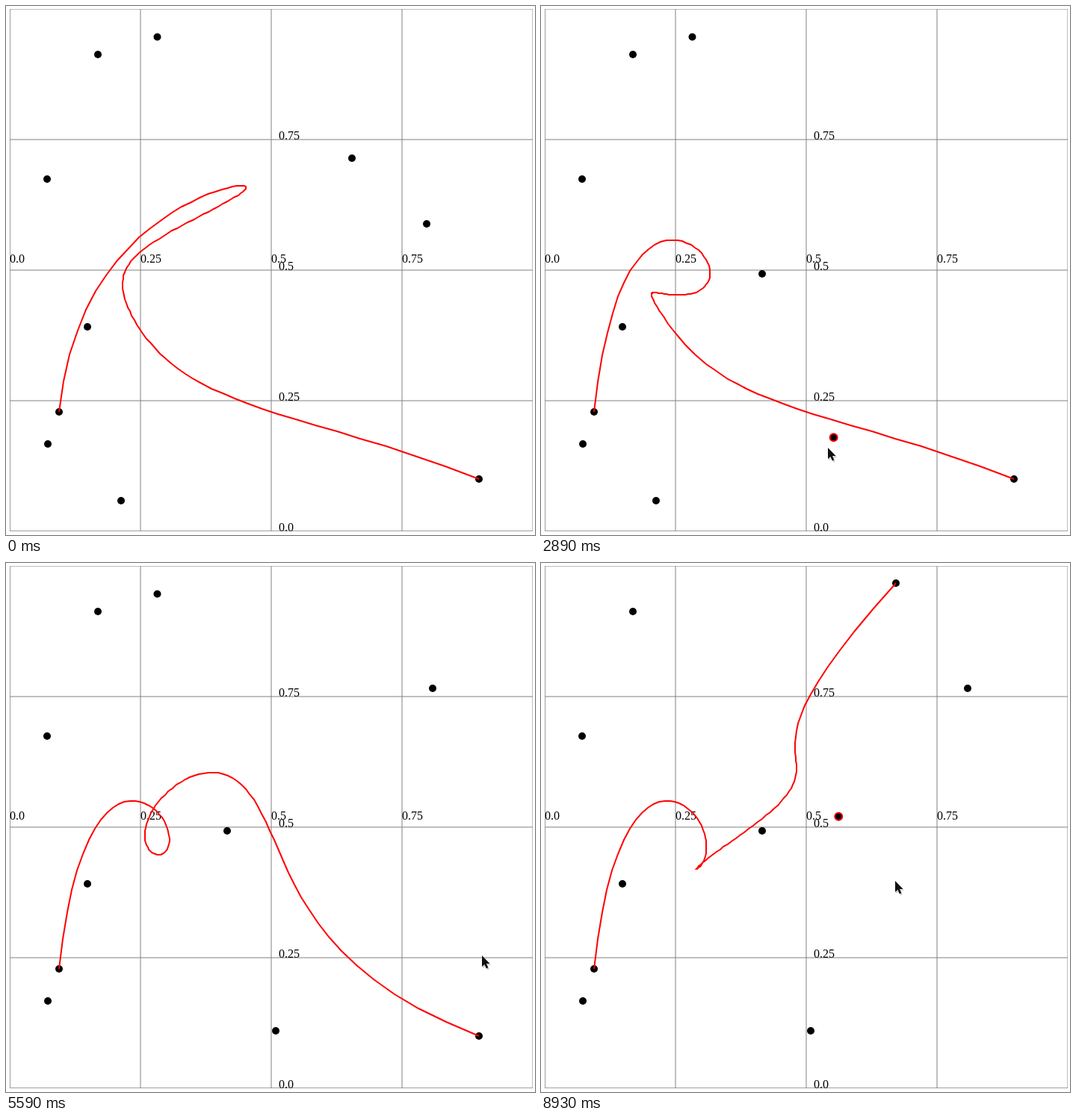
An HTML page for the animation above (8960 ms loop, 708 by 709 pixels).

```html
<!DOCTYPE html>
<html>
<head>
<meta charset="utf-8">
<style>
  html, body { margin: 0; width: 100%; height: 100%; overflow: hidden; background: #fff; }
  svg { display: block; }
  text { font: 16px "Liberation Serif", serif; }
  #grid path, #grid rect { fill: none; stroke: gray; }
  .held { stroke: red; stroke-width: 2; }
  #curve { fill: none; stroke: red; stroke-width: 2; }
</style>
</head>
<body>
<svg width="708" height="709">
  <svg id="grid" x="5" y="4" width="700" height="700"><rect width="700" height="700"/></svg>
  <g id="dots"></g>
  <path id="curve"/>
  <g id="cursor">
    <path d="M1 2V17L4.5 14L7 19.5L9.8 18.3L7.4 13H12Z" opacity=".22"/>
    <path d="M0 0V15L3.4 12L5.8 17.4L8.4 16.2L6 11H10.6Z" fill="#111" stroke="#fff" paint-order="stroke"/>
  </g>
</svg>
<script>
const LOOP = 8960, POINT_LAG = 40, CURVE_LAG = 52;
const $ = id => document.getElementById(id);

function add(parent, tag, attrs, text = '') {
  const el = document.createElementNS('http://www.w3.org/2000/svg', tag);
  for (const k in attrs) el.setAttribute(k, attrs[k]);
  el.textContent = text;
  return parent.appendChild(el);
}

const smooth = u => u * u * (3 - 2 * u);
const easeIn = u => u * u;
const easeOut = u => 1 - (1 - u) ** 3;

// control points of the Bezier curve, in order
const [A, D, G, F, C, I, E, J, B, H] = [
  [71, 544], [123, 65], [563, 292], [463, 204], [55, 232],
  [56, 587], [202.5, 41.5], [154, 663], [109, 430], [633, 634]];
const points = [A, D, G, F, C, I, E, J, B, H];
const corner = [122, 575];

// pointer strokes: start and end time, path, easing
const strokes = [
  [440, 1450, [G, [904, 10], [296, 359]], smooth],
  [1550, 1912, [[296, 359], [539, 218], F], smooth],
  [2440, 3240, [F, [505, 415], [361, 627]], easeOut],
  [3240, 3780, [[361, 627], J], smooth],
  [4119, 5236, [J, [375, 432], [571, 168]], smooth],
  [5240, 5800, [[571, 168], [657, 490], H], smooth],
  [5890, 6690, [H, corner], smooth],
  [6700, 7620, [corner, [54, 406], [-58, -58], [475, 27]], smooth],
  [7700, 8250, [[475, 27], E], smooth],
  [8640, 8930, [E, [318, 261], [474, 426]], easeIn]];

// dragged point, press and release time
const drags = [[G, 290, 1500], [F, 2040, 3240], [J, 3910, 5236], [H, 5850, 7650], [E, 8370, LOOP]];

// de Casteljau
function bezier(pts, t) {
  while (pts.length > 1)
    pts = pts.slice(1).map((p, i) => p.map((v, c) => pts[i][c] + (v - pts[i][c]) * t));
  return pts[0];
}

function pointer(t) {
  const [from, to, path, ease] = strokes.findLast(s => s[0] <= t) || strokes[0];
  return bezier(path, ease(Math.min(1, Math.max(0, (t - from) / (to - from)))));
}

function pointsAt(t, lag) {
  return points.map(p => {
    const drag = drags.find(d => d[0] === p && t > d[1]);
    return drag ? pointer(Math.min(Math.max(t - lag, drag[1]), drag[2] - 1)) : p;
  });
}

for (let i = 0; i < 4; i++) {
  const label = i % 2 ? i / 4 : (i / 4).toFixed(1), x = 175 * i, y = 700 - x;
  add($('grid'), 'path', { d: `M${x} 0V700M0 ${y}H700` });
  add($('grid'), 'text', { x, y: 340 }, label);
  add($('grid'), 'text', { x: 360, y }, label);
}
const dots = points.map(() => add($('dots'), 'circle', { r: 5 }));

function draw(t) {
  const held = drags.find(([, press, release]) => t >= press && t < release);
  pointsAt(t, POINT_LAG).forEach(([x, y], i) => {
    dots[i].setAttribute('cx', x);
    dots[i].setAttribute('cy', y);
    dots[i].setAttribute('class', held && held[0] === points[i] ? 'held' : '');
  });
  const pts = pointsAt(t, CURVE_LAG);
  const line = Array.from({ length: 101 }, (_, i) => bezier(pts, i / 100).map(Math.round));
  $('curve').setAttribute('d', 'M' + line.join('L'));
  $('cursor').setAttribute('transform', `translate(${pointer(t).map(Math.round)})`);
  $('cursor').setAttribute('visibility', t < strokes[0][0] ? 'hidden' : 'visible');
}

const t0 = performance.now();
function tick() {
  draw((performance.now() - t0) % LOOP);
  requestAnimationFrame(tick);
}
tick();
</script>
</body>
</html>
```
